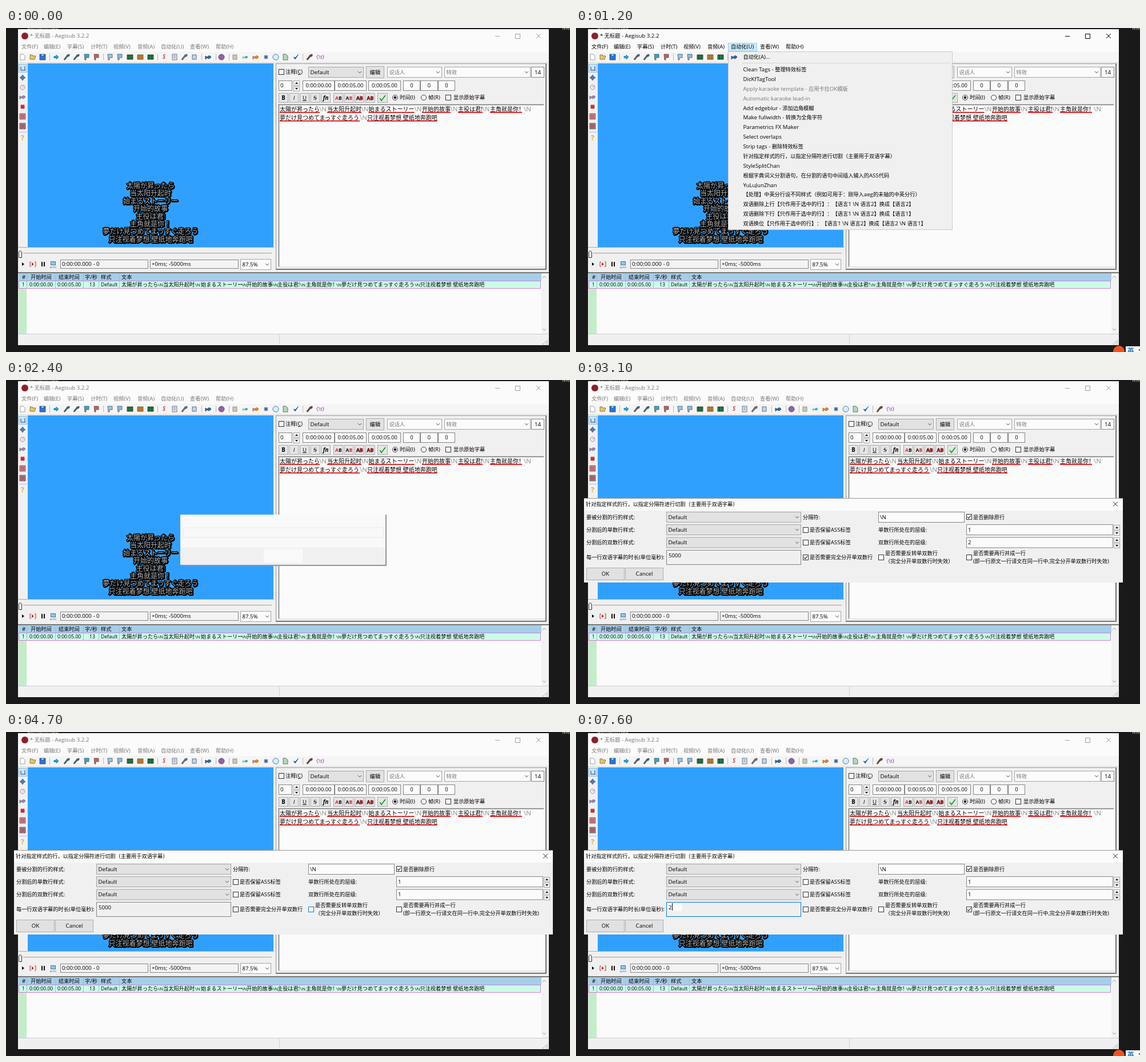
Recreate the animation shown at these times as an HTML page. Size 987 px wide and 568 px high, loop 8000 ms.

```html
<!DOCTYPE html>
<html lang="zh-CN">
<head>
<meta charset="utf-8">
<style>
html,body{margin:0;width:100%;height:100%;overflow:hidden;background:#191919}
svg{display:block;width:987px;height:568px}
text{font-family:"Open Sans","Noto Sans CJK SC","Noto Sans CJK JP",sans-serif;font-size:9.2px;white-space:pre;text-spacing-trim:space-all}
.a{font-size:1.05em}
.chrome{color:#777;fill:currentColor}
.chrome path{opacity:.7}
.active .chrome{color:#000}
.active .chrome path{opacity:1}
.sub text{font-size:12px;font-weight:300;fill:#b4b4b4;stroke:#000;stroke-width:3px;paint-order:stroke;stroke-linejoin:round;text-anchor:middle;filter:drop-shadow(1px 1px 0 #000)}
</style>
</head>
<body>
<svg id="stage" viewBox="0 0 987 568"></svg>
<script>
const LOOP = 8000;
const PAPER = '#fbfbfb';
const stage = document.getElementById('stage');

const rect = (x1, y1, x2, y2, fill, stroke) => stroke
  ? `<rect x="${x1 + .5}" y="${y1 + .5}" width="${x2 - x1 - 1}" height="${y2 - y1 - 1}" fill="${fill}" stroke="${stroke}"/>`
  : `<rect x="${x1}" y="${y1}" width="${x2 - x1}" height="${y2 - y1}" fill="${fill}"/>`;
const path = (d, stroke, width = 1, fill = 'none') =>
  `<path d="${d}" fill="${fill}" stroke="${stroke}" stroke-width="${width}"/>`;
const latin = s => s.replace(/[\x20-\x7e]+/g, run => `<tspan class="a">${run}</tspan>`);
// Text is placed by its left edge and vertical middle.
const text = (x, y, s, attrs = '') => `<text x="${x}" y="${y + 3.4}" ${attrs}>${latin(s)}</text>`;
const size = px => `style="font-size:${px}px"`;
const mid = 'text-anchor="middle"';
const group = (id, body, cls = '') => `<g id="${id}" class="${cls}">${body}</g>`;
const circle = (x, y, r, fill, stroke = 'none') =>
  `<circle cx="${x}" cy="${y}" r="${r}" fill="${fill}" stroke="${stroke}"/>`;

const chevron = (x, y) => path(`M${x - 3} ${y - 1.5}l3 3 3-3`, '#555');
const combo = (x1, y1, x2, y2, label, fill = '#e2e2e2', ink = '#000') =>
  rect(x1, y1, x2, y2, fill, '#a5a5a5') + text(x1 + 3.5, (y1 + y2) / 2, label, `fill="${ink}"`) + chevron(x2 - 7, (y1 + y2) / 2);
const field = (x1, y1, x2, y2, label, fill = PAPER) =>
  rect(x1, y1, x2, y2, fill, '#858585') + text(x1 + 3, (y1 + y2) / 2, label);
const centred = (x1, y1, x2, y2, label, fill, stroke, attrs = '') =>
  rect(x1, y1, x2, y2, fill, stroke) + text((x1 + x2) / 2, (y1 + y2) / 2, label, `${mid} ${attrs}`);
const box = (x, y, ink = '#333') => rect(x - 5, y - 5, x + 5, y + 5, '#fff', ink);
const tick = (x, y) => path(`M${x - 3} ${y}l2 2.5 4-5`, '#222', 1.2);
const spin = (x, y) => [-5, 5].map((d, i) => rect(x, y + d - 4, x + 11, y + d + 5, '#f4f4f4', '#aaa') +
  `<path d="M${x + 3} ${y + d + (i ? -1 : 2)}h5l-2.5 ${i ? 3 : -3}z"/>`).join('');

const shapes = {
  doc: 'M-4-5h5l3 3v7h-8z', folder: 'M-5-4h4l1 2h5l-2 6h-8z', disk: 'M-5-5h10v10h-10zM-2-5v3h4v-3',
  arrow: 'M-4-1.5h4v-2.5l4 4-4 4v-2.5h-4z', tool: 'M5-5l0 3-4 2-4 5-2-1 4-5 2-3z',
  flag: 'M-4-5h8v6h-5v4h-2z', film: 'M-5-4h10v8h-10zM-2-4v8M2-4v8', square: 'M-3-3h6v6h-6z',
  ball: 'M0-5a5 5 0 1 0 .1 0z', fish: 'M-5-2l3 2q4-5 7 0q-4 5-7 1l-3 3z', check: 'M-4 0l3 4 6-9-6 6z',
  cross: 'M0-5l2 3h-1v1h1v-1l3 2-3 2v-1h-1v1h1l-2 3-2-3h1v-1h-1v1l-3-2 3-2v1h1v-1h-1z',
  clip: 'M-4-5h8v10h-8zM-2-2h4M-2 1h4', dial: 'M0-4a4 4 0 1 0 .1 0zM0 0l3-3', note: 'M-4-4h7v8h-7z',
  frame: 'M-5-5h10v10h-10zM-2-2h4v4h-4z'
};
const icon = (x, y, [shape, fill, ink = '#456']) =>
  `<path transform="translate(${x} ${y})" d="${shapes[shape]}" fill="${fill}" stroke="${ink}" stroke-width=".8"/>`;

const toolbar = [
  [29, 'doc', '#fff', '#888'], [47, 'folder', '#e9c469', '#75602b'], [64, 'disk', '#2877d0', '#174b8f'],
  [88, 'arrow', '#18a4e8', '#127eb9'], [106, 'tool', '#466'], [123, 'tool', '#466'], [141, 'flag', '#39a9b4'], [158, 'flag', '#d35b4b'],
  [182, 'flag', '#9fc5e8'], [199, 'flag', '#8dbce2'], [217, 'film', '#248447', '#222'], [235, 'film', '#c3883b', '#642'], [253, 'film', '#248447', '#222'],
  [295, 'clip', '#dcecf8'], [312, 'tool', '#777', '#444'], [330, 'note', '#bcd7ee'], [354, 'fish', '#246fc1', '#235'],
  [377, 'ball', '#8a65ad', '#536'], [401, 'note', '#bcc', '#974'], [419, 'fish', '#3bb0ba', '#dee'], [437, 'fish', '#e58527', '#b52'],
  [455, 'square', '#456b9e', '#bbc'], [472, 'ball', '#d8edff', '#145ca4'], [489, 'doc', '#b9d8b4'], [507, 'check', '#2568b8', '#2568b8'], [531, 'tool', '#764c36', '#333']
];
const tools = [
  [87, 'cross', '#4b8dd0'], [104, 'dial', '#e9edf4', '#a67'], [121, 'fish', '#b77796', '#579'],
  [138, 'square', '#e22525', '#e22525'], [155, 'frame', '#da7777', '#567'], [172, 'frame', '#bb6f71', '#456']
];

const lyrics = ['太陽が昇ったら', '当太阳升起时', '始まるストーリー', '开始的故事', '主役は君!', '主角就是你！', '夢だけ見つめてまっすぐ走ろう', '只注视着梦想 壁纸地奔跑吧'];

function backdrop() {
  return rect(0, 0, 987, 568, '#191919') +
    text(37, -1, 'demon.mp3', 'fill="#ccc"') + text(973, 0, 'Me', 'fill="#ccc"') +
    rect(21, 2, 950, 556, '#f0f0f0') + rect(21, 2, 950, 42, PAPER);
}

function header() {
  const names = [[27, '文件(F)'], [66, '编辑(E)'], [107, '字幕(S)'], [148, '计时(T)'], [188, '视频(V)'], [230, '音频(A)'], [271, '自动化(U)'], [322, '查看(W)'], [367, '帮助(H)']];
  const bar = toolbar.map(([x, ...look]) => icon(x, 51, look)).join('');
  const gaps = [76, 170, 265, 342, 367, 390, 519].map(x => rect(x, 45, x + 1, 57, '#bbb')).join('');
  return circle(33, 14, 6, '#8d2127') +
    group('tab', rect(266, 26, 317, 41, '#cce8ff', '#99d1ff')) +
    group('chrome', text(42, 14, '* 无标题 - Aegisub 3.2.2') + names.map(([x, s]) => text(x, 33, s)).join('') +
      path('M856 14.5h8M891.5 10.5h8v8h-8zM928 10l8 8M936 10l-8 8', 'currentColor'), 'chrome') +
    rect(21, 42, 950, 61, '#f5f5f5') + rect(21, 60, 950, 61, '#d9d9d9') + bar + gaps +
    text(274, 51, 'S', 'fill="#c34559" font-style="italic" font-weight="700"') + text(543, 51, '{\\t}', 'fill="#a12bb8"');
}

function video() {
  const subs = lyrics.map((s, i) => `<text x="253" y="${281 + i * 13.4}">${s}</text>`).join('');
  return rect(22, 63, 37, 78, '#cce4f7', '#8bbce5') + path('M26 68v6h8M33 67v7', '#246', 1) +
    tools.map(([y, ...look]) => icon(29, y, look)).join('') + rect(23, 182, 36, 183, '#bbb') +
    text(26, 194, '?', 'fill="#e5b600" font-weight="700" style="font-size:12px"') +
    rect(38, 62, 468, 384, '#30a0ff') + `<g class="sub" lang="ja">${subs}</g>` +
    rect(21, 384, 469, 385, '#aaa') + rect(30, 394, 465, 396, '#ddd') + rect(30, 394, 465, 395, '#aaa') +
    path('M22.5 392.5l2.5-2 2.5 2v10h-5z', '#333', 1, '#f4f4f4') +
    '<path d="M28 411l4 3-4 3z"/>' + path('M44 410h-2v8h2M50 410h2v8h-2', '#b33') + '<path fill="#c22" d="M45 411l4 3-4 3z"/>' +
    rect(62, 410, 64, 418, '#111') + rect(66, 410, 68, 418, '#111') +
    rect(78, 409, 87, 416, '#8ec6e8', '#47a') + text(77, 418, 'AUTO', 'fill="#15a" style="font-size:4px"') +
    field(95, 406, 249, 422, '0:00:00.000 - 0', '#f3f3f3') + field(252, 406, 407, 422, '+0ms; -5000ms', '#f3f3f3') +
    combo(410, 405, 464, 424, '87.5%', PAPER);
}

function squiggled(x, y, s, width) {
  return text(x, y, s, size(10)) + rect(x, y + 4, x + width, y + 6, 'url(#wave)');
}

function editor() {
  const times = [[519, 575, '0:00:00.00'], [575, 631, '0:00:05.00'], [634, 691, '0:00:05.00'], [695, 725, '0'], [725, 756, '0'], [756, 786, '0']];
  const styles = ['B', 'I', 'U', 'S', 'fn'].map((s, i) => centred(477 + i * 18.5, 114, 494 + i * 18.5, 131, s, '#e5e5e5', '#aaa',
    ['font-weight="700"', 'font-style="italic"', 'text-decoration="underline"', 'text-decoration="line-through"', 'font-style="italic" font-weight="700"'][i]));
  const inks = [0, 1, 2, 3].map(i => {
    const x = 573 + i * 18.5;
    const dark = i > 1 ? 'stroke="#722" stroke-width=".8"' : '';
    return rect(x, 114, x + 17, 131, '#e5e5e5', '#aaa') +
      `<text x="${x + 3}" y="126" font-weight="700" style="font-size:8.5px" ${dark}><tspan fill="${i % 3 ? '#111' : '#d22'}">A</tspan><tspan fill="${i ? '#d22' : '#111'}">B</tspan></text>`;
  });
  const runs = [[479, 70], [562, 60], [634.5, 80], [728, 50], [791, 43], [847, 56]];
  const breaks = [548, 621.5, 714.5, 777.5, 833.5, 906, 619];
  return rect(472, 62, 946, 424, '#f0f0f0', '#999') + rect(944, 62, 946, 424, '#777') + rect(472, 422, 946, 424, '#777') +
    box(482, 77) + text(489, 77, '注释(C)') + rect(511, 81, 516, 82, '#000') +
    combo(529, 68, 626, 87, 'Default') + centred(630, 67, 662, 88, '编辑', '#e3e3e3', '#aaa') +
    combo(667, 68, 763, 87, '说话人', PAPER, '#777') + combo(767, 68, 918, 87, '特效', PAPER, '#777') + centred(919, 68, 942, 87, '14', PAPER, '#858585') +
    field(477, 92, 501, 110, '0') + spin(503, 101) +
    times.map(([a, b, s]) => centred(a, 92, b, 110, s, PAPER, '#858585', size(8.9))).join('') +
    styles.join('') + inks.join('') + rect(650, 114, 668, 131, '#e5e5e5', '#aaa') + path('M654 123l3 4 7-9', '#25a52f', 2) +
    circle(681, 122, 4.5, '#fff', '#333') + circle(681, 122, 2.4, '#222') + text(689, 122, '时间(I)') +
    circle(731, 122, 4.5, '#fff', '#333') + text(739, 122, '帧(R)') + box(774, 122) + text(783, 122, '显示原始字幕') +
    rect(477, 134, 942, 419, PAPER) + path('M477.5 419V134.5H941', '#777', 1.4) + rect(477, 418, 942, 419, '#ddd') +
    runs.map(([x, w], i) => squiggled(x, 143, lyrics[i], w)).join('') +
    squiggled(479, 158, lyrics[6], 140) + squiggled(632, 158, lyrics[7], 123) +
    breaks.map((x, i) => text(x, i < 6 ? 143 : 158, '\\N', `fill="#8a8a8a" ${size(11)}`)).join('');
}

function grid() {
  const heads = [[28, '#'], [43, '开始时间'], [92, '结束时间'], [138, '字/秒'], [166, '样式'], [202, '文本']];
  const cells = [[28, '1'], [41, '0:00:00.00'], [90, '0:00:05.00'], [146, '13'], [166, 'Default']];
  const starts = [202, 275, 341, 421, 475, 525, 587, 724.5];
  const breaks = [266, 331, 412.5, 467, 515, 578, 715.5];
  return rect(21, 428, 950, 430, '#777') + rect(22, 430, 937, 536, PAPER) + rect(22, 430, 937, 443, '#a5cfe8') +
    rect(22, 443, 36, 536, '#c4ecc9') + rect(22, 443, 936, 457, '#ccfbe9', '#d37bd5') +
    [36, 86, 135, 162, 198].map(x => rect(x, 431, x + 1, 456, '#9dbfc5')).join('') +
    heads.map(([x, s]) => text(x, 436.5, s)).join('') + cells.map(([x, s]) => text(x, 450, s, size(8.2))).join('') +
    lyrics.map((s, i) => text(starts[i], 450, s)).join('') + breaks.map(x => text(x, 450, '\\N', size(7.6))).join('') +
    rect(937, 430, 949, 536, '#f3f3f3') + path('M939 438l3-3 3 3M939 527l3 3 3-3', '#999') +
    rect(21, 536, 950, 537, '#ccc') + rect(478, 538, 479, 555, '#d0d0d0') +
    [0, 1, 2].map(i => rect(946 - i * 3, 547 + i * 3, 948 - i * 3, 549 + i * 3, '#bbb') + rect(946, 547 + i * 3, 948, 549 + i * 3, '#bbb')).join('');
}

function menu() {
  const items = ['Clean Tags - 整理特效标签', 'DicKfTagTool', 'Apply karaoke template - 应用卡拉OK模版', 'Automatic karaoke lead-in', 'Add edgeblur - 添加边角模糊', 'Make fullwidth - 转换为全角字符', 'Parametrics FX Maker', 'Select overlaps', 'Strip tags - 删除特效标签',
    '针对指定样式的行，以指定分隔符进行切割（主要用于双语字幕）', 'StyleSplitChan', '根据字典词义分割语句，在分割的语句中间插入输入的ASS代码', 'YuLuJunZhan', '【处理】中英分行设不同样式（例如可用于：刚导入aeg的未轴的中英分行）',
    '双语删除上行【只作用于选中的行】：【语言1 \\N 语言2】换成【语言2】', '双语删除下行【只作用于选中的行】：【语言1 \\N 语言2】换成【语言1】', '双语换位【只作用于选中的行】：【语言1 \\N 语言2】换成【语言2 \\N 语言1】'];
  return rect(266, 41, 659, 354, '#f0f0f0', '#cacaca') + icon(277, 51, ['fish', '#246fc1', '#235']) +
    text(292.5, 50.5, '自动化(A)...') + rect(291, 61, 656, 62, '#d5d5d5') +
    group('hover', rect(268, -8.5, 656, 8.5, '#91c9f7')) +
    items.map((s, i) => text(292.5, 72.7 + i * 16.87, s, i === 2 || i === 3 ? 'fill="#777"' : '')).join('');
}

function wait() {
  return rect(305, 236, 666, 326, '#f9f9f9') + rect(305, 294, 665, 325, '#f0f0f0') +
    rect(309, 258, 662, 277, '#f9f9f9', '#f0f0f0') + rect(310, 259, 661, 276, '#f9f9f9', '#f1f1f1') +
    rect(451, 296, 519, 320, '#f9f9f9') + path('M665 236v89H305', '#777', 1.5);
}

function dialog() {
  const rows = [240.5, 262.5, 285];
  const labels = ['要被分割的行的样式:', '分割后的单数行样式:', '分割后的双数行样式:'];
  const outline = (id, x1, y1, x2, y2) => group(id, rect(x1, y1, x2, y2, 'none', '#0078d7'));
  const hoverBox = (id, x, y) => outline(id, x - 5, y - 5, x + 5, y + 5);
  return rect(14, 207, 957, 355, '#f0f0f0') + rect(14, 207, 957, 229, PAPER) + rect(14, 207, 957, 208, '#999') +
    text(17, 217.5, '针对指定样式的行，以指定分隔符进行切割（主要用于双语字幕）') + path('M940 213.5l8 8M948 213.5l-8 8', '#222') +
    rows.map((y, i) => text(18, y, labels[i]) + combo(158, y - 9.5, 394, y + 9.5, 'Default')).join('') +
    text(397, 240.5, '分隔符:') + field(529, 231, 680, 250, '\\N') + box(688, 240) + tick(688, 240) + text(695, 240.5, '是否删除原行') +
    [262.5, 285].map((y, i) => box(402, Math.round(y)) + text(409, y, '是否保留ASS标签') +
      text(529, y, (i ? '双' : '单') + '数行所处在的层级:') + rect(683, y - 9.5, 940, y + 9.5, PAPER, '#858585') + spin(941, Math.round(y))).join('') +
    text(686, 262.5, '1') + group('two', text(686, 285, '2')) + group('one', text(686, 285, '1')) +
    text(18, 310.5, '每一行双语字幕的时长(单位毫秒):') + rect(158, 298, 394, 324, '#f0f0f0', '#858585') +
    group('erased', rect(162, 300, 185, 314, PAPER)) + '<text id="duration" x="162" y="310.5" style="font-size:9.66px"></text>' +
    group('caret', rect(0, 300, 1, 313, '#000')) +
    box(402, 311) + group('full', tick(402, 311)) + text(409, 310.5, '是否需要完全分开单双数行') +
    box(534, 311) + text(541, 304, '是否需要反转单双数行') + text(541, 317.5, '（完全分开单双数行时失效）') +
    box(688, 311) + group('merge', tick(688, 311)) + text(695, 304, '是否需要两行并成一行') + text(695, 317.5, '(即一行原文一行译文在同一行中,完全分开单双数行时失效)') +
    outline('singleHot', 683, 253, 940, 272) + outline('doubleHot', 683, 276, 940, 295) + outline('durationHot', 158, 298, 394, 324) +
    hoverBox('fullHot', 402, 311) + hoverBox('reverseHot', 534, 311) + hoverBox('mergeHot', 688, 311) +
    centred(18, 329, 85, 351, 'OK', '#e1e1e1', '#adadad') + centred(86, 329, 153, 351, 'Cancel', '#e1e1e1', '#adadad');
}

stage.innerHTML = '<defs><pattern id="wave" width="4" height="2" patternUnits="userSpaceOnUse"><path d="M0 1.5L1 .5 2 1.5 3 .5 4 1.5" fill="none" stroke="#d00" stroke-width="1.3"/></pattern></defs>' +
  backdrop() + header() + video() + editor() + grid() +
  group('help', text(22, 547.5, 'Use it to Split Styled Bilingual line to N lines with specific style 将制定样式的行，根据分隔符，切割成多行')) +
  group('menu', menu()) + group('wait', wait()) + group('dialog', dialog()) +
  group('ime', rect(962, 558, 987, 568, '#fff') + circle(950, 567, 10, '#f4511e') + text(965, 567, '英', 'fill="#1673d1" font-weight="700" style="font-size:11.5px"') + rect(985, 563, 987, 566, '#1673d1'));

// Alternating on and off times in ms.
const switches = {
  tab: [1000, 2100], menu: [1100, 2100], hover: [1300, 2100], help: [1700, 2100],
  wait: [2300, 2600], dialog: [2600], ime: [1000, 2100, 3900, 4500, 6000],
  singleHot: [3500, 3700], doubleHot: [3900, 4500], two: [0, 4200], one: [4200],
  full: [0, 4500], fullHot: [3700, 3900, 4400, 4700], reverseHot: [4700, 5000],
  mergeHot: [5200, 5600], merge: [5400], durationHot: [5800], caret: [6000], erased: [6800]
};
const durations = [[0, '5000'], [6800, '500'], [6900, '50'], [7300, '5'], [7400, ''], [7600, '2']];
const hovered = [[0, 1], [1400, 4], [1500, 7], [1600, 8], [1700, 9]];
const $ = id => document.getElementById(id);
const at = (steps, t) => steps.filter(([time]) => time <= t).pop()[1];

function draw(t) {
  for (const id in switches)
    $(id).style.display = switches[id].filter(time => time <= t).length % 2 ? '' : 'none';
  stage.classList.toggle('active', t >= 1000 && t < 2200);
  $('hover').setAttribute('transform', `translate(0 ${72.7 + at(hovered, t) * 16.87})`);
  $('dialog').style.opacity = Math.min(1, (t - 2500) / 200);
  const value = at(durations, t);
  $('duration').textContent = value;
  $('caret').setAttribute('transform', `translate(${162 + Math.round(value.length * 5.53)} 0)`);
}

const start = performance.now();
function frame() {
  draw((performance.now() - start) % LOOP);
  requestAnimationFrame(frame);
}
frame();
</script>
</body>
</html>
```
